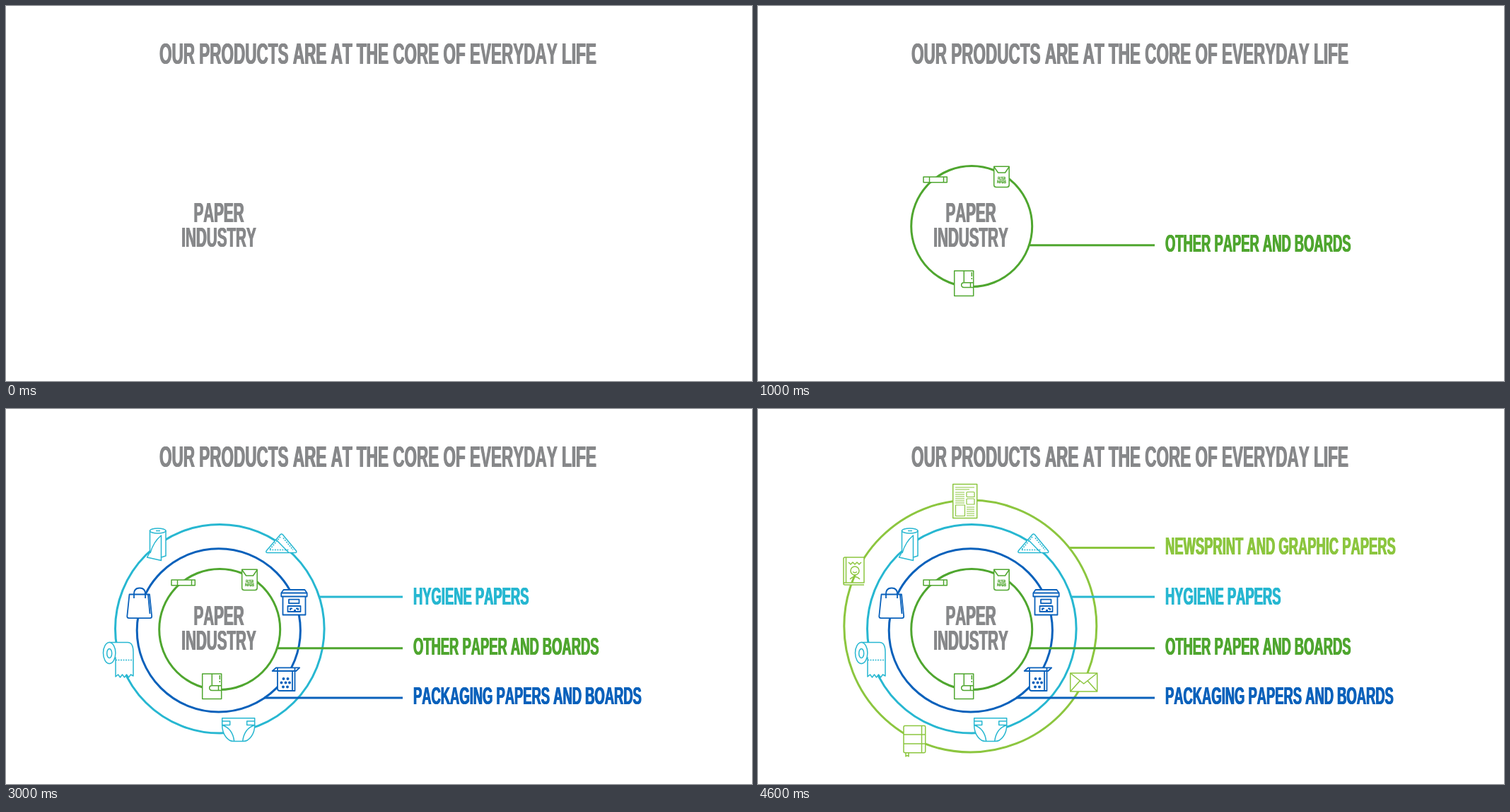
An HTML page that plays this animation: 1055 px wide and 531 px high, repeating every 5000 ms.

```html
<!DOCTYPE html>
<html lang="en">
<head>
<meta charset="utf-8">
<title>Paper industry</title>
<style>
  html, body { margin: 0; width: 100%; height: 100%; overflow: hidden; background: #fff; }
  .stage { position: absolute; left: 0; top: 0; width: 1055px; height: 531px; overflow: hidden; color: #87888a; }
  .layer, svg { position: absolute; left: 0; top: 0; width: 1055px; height: 531px; }

  /* Condensed capitals; --y is the baseline. */
  p {
    position: absolute; left: 576px; top: var(--y); margin: 0;
    font: bold 34.3px/1 "Liberation Sans", Arial, sans-serif;
    font-kerning: none; white-space: nowrap;
    text-shadow: 1px 0, -1px 0;
    transform: translateY(-.8465em) scaleX(.536); transform-origin: 0 0;
  }
  .title { left: 217px; font-size: 42px; }
  .core { left: 300.5px; font-size: 38.5px; transform: translate(-50%, -.8465em) scaleX(.536); transform-origin: 50% 0; }

  svg { fill: none; stroke: currentColor; stroke-width: 3; }
  .icons { fill: #fff; stroke-width: 1.5; stroke-linejoin: round; }
  .open { fill: none; }
  .solid { fill: currentColor; stroke: none; }
  .dash { fill: none; stroke-dasharray: 2 1.5; }
  .tiny { font: bold 6px "Liberation Sans", Arial, sans-serif; text-anchor: middle; fill: currentColor; stroke-width: .4; }

  .layer { animation: 5s step-end infinite; }
  .other { color: #4fa62f; animation-name: at1; }
  .packaging { color: #0a61bb; animation-name: at2; }
  .hygiene { color: #27b7d1; animation-name: at3; }
  .newsprint { color: #8cc63f; animation-name: at4; }
  .packaging .icons { stroke-width: 1.8; }
  @keyframes at1 { 0% { visibility: hidden } 20%, 100% { visibility: visible } }
  @keyframes at2 { 0% { visibility: hidden } 40%, 100% { visibility: visible } }
  @keyframes at3 { 0% { visibility: hidden } 60%, 100% { visibility: visible } }
  @keyframes at4 { 0% { visibility: hidden } 80%, 100% { visibility: visible } }
</style>
</head>
<body>
<div class="stage">
  <p class="title" style="--y:83px">OUR PRODUCTS ARE AT THE CORE OF EVERYDAY LIFE</p>
  <p class="core" style="--y:307px">PAPER</p>
  <p class="core" style="--y:342px">INDUSTRY</p>

  <div class="layer newsprint">
    <svg>
      <circle cx="300.3" cy="307.5" r="178.5"/>
      <path d="M440 196.5H561"/>
      <g class="icons">
        <!-- newspaper -->
        <path d="M275.7 106.5h34v48h-34z"/>
        <path class="open" stroke-width="1" d="M279 111h27M279 114h20M279 118h13m-13 3h13m-13 3h13m-13 3h13m-13 3h13m-13 3h13M295 139h11m-11 3h11m-11 3h11m-11 3h11m-11 3h11"/>
        <path stroke-width="1.2" d="M279.5 136h13v15.500h-13zM296 117.500h9q1 0 1 1v6h-10q-1 0-1-1v-5q0-1 1-1zM296 127h9q1 0 1 1v7h-10q-1 0-1-1v-6q0-1 1-1z"/>
        <!-- magazine -->
        <path d="M123 210h27v36h-27q-2 0-2 1.500t2 1.500h27M121 247.500V212q0-2 2-2"/>
        <path class="open" d="M124.500 210v36M128 217l3 3 3-3 3 3 3-3 3 3 3-3M130 241q7-7 14 0"/>
        <circle cx="137" cy="229" r="6"/>
        <path class="open" d="M134 230.500q3 2.500 6 0"/>
        <!-- envelope -->
        <path d="M441.700 374h38v26h-38z"/>
        <path class="open" d="M441.700 374l19 15 19-15M441.700 400l13.500-15M479.700 400l-13.500-15"/>
        <!-- notebook -->
        <path d="M209 486v6l2-1.500 2 1.500v-6"/>
        <path d="M208 448.500h27q1.700 0 1.700 1.700V485q0 1.700-1.700 1.700h-27q-2 0-2-2v-34q0-2.200 2-2.200z"/>
        <path class="open" d="M231.500 448.500v38M206 461h30.500M206 474h30.500"/>
      </g>
    </svg>
    <p style="--y:206px">NEWSPRINT AND GRAPHIC PAPERS</p>
  </div>

  <div class="layer hygiene">
    <svg>
      <circle cx="302.300" cy="311.300" r="147.800"/>
      <path d="M443 266H561"/>
      <g class="icons">
        <!-- kitchen roll -->
        <path d="M203.500 172.500V203l-4 7 20 4.500V210l6.500-2v-35.500z"/>
        <ellipse cx="214.700" cy="172.500" rx="11.200" ry="3.500"/>
        <path class="open" d="M219.500 210V179q-11 9-15.500 25"/>
        <path class="open" d="M212 172.500h6"/>
        <!-- napkins -->
        <path d="M391 177.500l19.500 23.500q1 2.500-1.500 2.500h-39q-3.500 0-1.500-3l18-21q2.500-3.500 4.500-2z"/>
        <path class="dash" d="M388 181l-15.500 18.500h27M392 182.500l14 17"/>
        <path class="open" d="M382 185l18 18.500"/>
        <!-- toilet roll -->
        <path d="M146 330.500h26q8 0 8 14V378l-3.500-2-3 4-3-4-3 4-3-4-3 4-3-4-3.500 3V352l-9 8.500z"/>
        <ellipse cx="146.200" cy="345.500" rx="8.700" ry="15"/>
        <ellipse cx="146.200" cy="346" rx="3.500" ry="6.500"/>
        <path class="dash" d="M155 355.500h25"/>
        <!-- nappy -->
        <path d="M305.700 437.700h46v10c0 13-8 22.800-16 22.800h-14c-8 0-16-9.800-16-22.800z"/>
        <path class="open" d="M305.700 442h11v5.500h-11q15 5 17 23M351.700 442h-11v5.500h11q-15 5-17 23"/>
      </g>
    </svg>
    <p style="--y:276.500px">HYGIENE PAPERS</p>
  </div>

  <div class="layer packaging">
    <svg>
      <circle cx="300.800" cy="313.400" r="115.600"/>
      <path d="M365 409H561"/>
      <g class="icons">
        <!-- carrier bag -->
        <path d="M174.500 262.500h28.500l3.200 31q0 2.700-2.700 2.700h-29.500q-2.700 0-2.700-2.700z"/>
        <path class="open" d="M181 268v-6q0-8.500 8-8.500t8 8.500v6M201 263l2.500 27"/>
        <!-- archive box -->
        <path d="M391.500 265h32v26.500h-32z"/>
        <path d="M392.500 256h30l3.200 4.500v5h-36.400v-5z"/>
        <path class="open" d="M389.500 260.500h36M400 269.700h14.500v5.500H400zM398.500 279h18v8h-18z"/>
        <path class="open" d="M402 285v-2.500h3m2 2.500h3m0-2.500h3v2.500"/>
        <!-- punched carton -->
        <path d="M384 371h24.500v28H387q-3 0-3-3z"/>
        <path d="M376.700 371l5.500-4.700h33l-5 4.700z"/>
        <path class="open" d="M384 366.500v4.500M408.500 366.500v4.500M405 371v28"/>
        <path class="open" stroke-width="4" stroke-linecap="round" d="M392.500 382h0M398.500 382h0M389.500 387.500h0M395.500 387.500h0M401 387.500h0M392 393.500h0M398 393.500h0"/>
      </g>
    </svg>
    <p style="--y:418px">PACKAGING PAPERS AND BOARDS</p>
  </div>

  <div class="layer other">
    <svg>
      <circle cx="302.200" cy="312" r="85.500"/>
      <path d="M383 338.700H561"/>
      <g class="icons">
        <!-- cigarette -->
        <path d="M234 242h33.300v7.700H234z"/>
        <path class="open" d="M242.500 242v7.700M262.500 242v7.700"/>
        <!-- filter pack -->
        <path d="M333.700 227.300h21.500v26q0 3.200-3.200 3.200h-15q-3.300 0-3.300-3.200z"/>
        <path class="open" d="M334 228l5.500 8h10l5.500-8"/>
        <g class="tiny" transform="translate(344.500 0) scale(.536 1)">
          <text y="246">FILTER</text>
          <text y="251">PAPERS</text>
        </g>
        <!-- wrapping sheet -->
        <path d="M277.700 375h27v35.500h-27z"/>
        <path class="open" d="M291.300 375v16.500M304.700 391.700h-13.500q-3.500 0-3.500 3.400t3.500 3.400h13.500M300.500 391.700v6.800M302.300 377v6M302.300 385v2"/>
      </g>
    </svg>
    <p style="--y:347.500px">OTHER PAPER AND BOARDS</p>
  </div>
</div>
</body>
</html>
```
